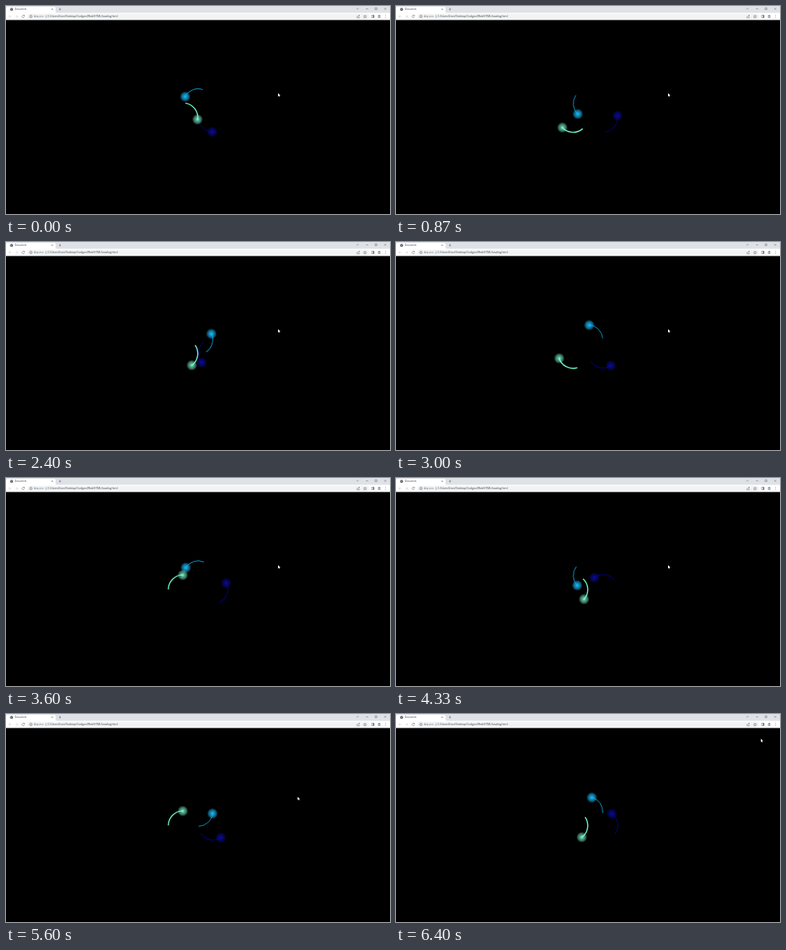
Write an HTML page that moves like this. It is 480 px wide and 260 px high and loops after 6470 ms.

```html
<!DOCTYPE html>
<html lang="en">
<head>
<meta charset="utf-8">
<title>Document</title>
<style>
  html, body { margin: 0; width: 100%; height: 100%; overflow: hidden; background: #000; }
  svg { display: block; width: 480px; height: 260px; }
  text { font-family: "Open Sans", "Noto Sans", sans-serif; fill: #3c4043; }
  .icon { fill: none; stroke: #5f6368; stroke-width: .5; }
  .off { stroke: #c0c3c7; }
</style>
</head>
<body>
<svg viewBox="0 0 480 260">
  <defs id="defs"></defs>
  <rect width="480" height="260"/>

  <!-- browser bar -->
  <rect width="480" height="9" fill="#dee1e6"/>
  <path d="M0 9V2.5Q0 1 2 1H60Q62 1 62 3V7Q62 8.5 64 8.5H480V17.5H0Z" fill="#fff"/>
  <rect x="27" y="9.8" width="427" height="6.8" rx="3.4" fill="#f1f3f4"/>
  <circle cx="7" cy="4.2" r="1.9" fill="#5f6368"/>
  <path d="M5.9 3.6L7 4.6L8.2 3.4" fill="none" stroke="#dee1e6" stroke-width=".5"/>
  <text x="11" y="5.3" font-size="3">Document</text>
  <text x="35" y="14.3" font-size="3.3" style="fill:#73777c">Arquivo</text>
  <text x="52" y="14.3" font-size="3.3">C:/Users/User/Desktop/Codigos/Web/HTML/loading.html</text>
  <path class="icon" d="M56.8 3.2l1.8 1.8m0-1.8l-1.8 1.8M66 4.1h3M67.5 2.6v3
    M438 2.7l1.4 1.3 1.4-1.3M450 3.6h2.6M461.4 2.3h2.2v2.2h-2.2zM473 2.4l2.2 2.2m0-2.2l-2.2 2.2
    M23 12.2a1.6 1.6 0 1 0 .1 1.4M23.2 11.2v1.3h-1.3M50 11.4v3.4
    M31.2 12.7v1.3M31.2 11.8v.4
    M438.8 12.6v2.2h3v-1.2M439.8 13.6q0-1.8 2-1.8M441 11l1 .8-1 .8
    M448.8 11.3l.6 1.2 1.3.2-1 .9.3 1.3-1.2-.6-1.2.6.3-1.3-1-.9 1.3-.2z"/>
  <circle class="icon" cx="31.2" cy="13" r="1.6"/>
  <path class="icon off" d="M6.6 13H3.6M5 11.6L3.6 13 5 14.4M11.8 13h3M13.4 11.6L14.8 13l-1.4 1.4"/>
  <path class="icon" d="M457 11.5h3v3h-3z"/>
  <path d="M458.7 11.5h1.4v3h-1.4z" fill="#5f6368"/>
  <circle cx="466.5" cy="13" r="2.2" fill="#cfd3d8"/>
  <circle cx="466.5" cy="12.3" r=".8" fill="#5f6368"/>
  <path d="M465 14.6q1.5-1.8 3 0z" fill="#5f6368"/>
  <path d="M474.5 11.2v.6m0 .9v.6m0 .9v.6" stroke="#5f6368" stroke-width=".6"/>

  <g id="rings"></g>
  <path id="cursor" d="M0 0V4L.95 3.2L1.6 4.6L2.3 4.3L1.7 2.95L2.9 2.8Z" fill="#fff"/>
</svg>
<script>
const LOOP = 6470, STEP = 200 / 3, LAST = 96, R = 18.4;
const rings = [
  { x: 258.8, y: 139.2, color: '#00008b', core: '#0a0aa0', glow: .75, width: .9, span: 89, start: 113, speed: -360 / 2600 },
  { x: 240, y: 122, color: '#0c94c8', core: '#18b8f4', glow: .85, width: .9, span: 80, start: 223.5, speed: -360 / 3500 },
  { x: 221.3, y: 139.5, color: '#6ff5c4', core: '#7fffd0', glow: .72, width: 1.4, span: 88, start: -19, speed: 360 / 2000 }
];
// pointer path: time, x, y
const pointer = [[5370, 340, 109], [5600, 364.5, 103.5], [5800, 420, 66], [5970, 457, 37], [6400, 456, 31]];

const el = id => document.getElementById(id);

rings.forEach((r, i) => {
  const dir = Math.sign(r.speed), a = -dir * r.span * Math.PI / 180;
  el('defs').innerHTML += `<radialGradient id="ball${i}">
    <stop offset="0" stop-color="${r.core}"/>
    <stop offset="0.25" stop-color="${r.core}" stop-opacity="${r.glow}"/>
    <stop offset="0.7" stop-color="${r.core}" stop-opacity="${r.glow * .55}"/>
    <stop offset="1" stop-color="${r.core}" stop-opacity="0"/></radialGradient>`;
  el('rings').innerHTML += `<g>
    <path d="M${R} 0A${R} ${R} 0 0 ${dir > 0 ? 0 : 1} ${R * Math.cos(a)} ${R * Math.sin(a)}"
      fill="none" stroke="${r.color}" stroke-width="${r.width}"/>
    <circle cx="${R - .2}" r="6.8" fill="url(#ball${i})"/></g>`;
});

function pointerAt(t) {
  if (t <= pointer[0][0]) return pointer[0].slice(1);
  const i = pointer.findIndex(p => p[0] >= t);
  if (i < 0) return pointer[pointer.length - 1].slice(1);
  const [t0, x0, y0] = pointer[i - 1], [t1, x1, y1] = pointer[i];
  const k = (t - t0) / (t1 - t0);
  return [x0 + (x1 - x0) * k, y0 + (y1 - y0) * k];
}

function draw(now) {
  const t = Math.min(LAST, Math.floor((now % LOOP + 4) / STEP)) * STEP;
  const spin = t + Math.max(0, 145 * (1 - t / 600)); // rings start slightly ahead
  rings.forEach((r, i) => el('rings').children[i].setAttribute('transform',
    `translate(${r.x} ${r.y}) rotate(${r.start + r.speed * spin})`));
  el('cursor').setAttribute('transform', `translate(${pointerAt(t)})`);
}

let begin;
function tick(now) {
  begin ??= now;
  draw(now - begin);
  requestAnimationFrame(tick);
}
draw(0);
requestAnimationFrame(tick);
</script>
</body>
</html>
```
